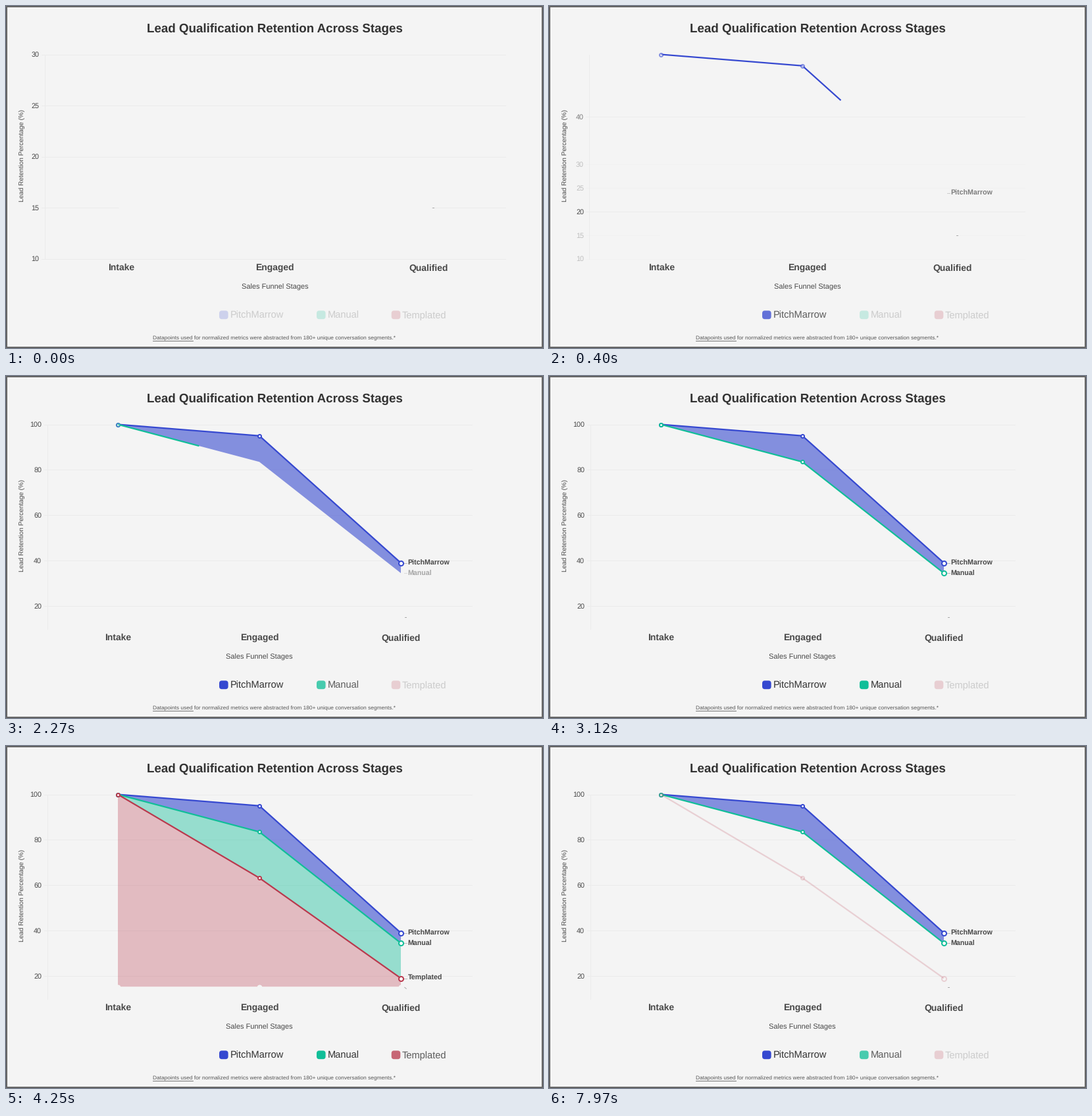
Animation of 816x519 px, one loop 8 s. Source, as a matplotlib script:

```python
import matplotlib.pyplot as plt
import numpy as np
from matplotlib.animation import FuncAnimation
from matplotlib.patches import FancyBboxPatch, Polygon, Rectangle

W, H, STEP, LOOP = 816, 519, 20, 8000
BG, DARK, MID = "#f4f4f4", "#333333", "#484848"
TOP, BOTTOM = 73.5, 383.5
CLIP_MS, FADE_MS = 714, 662

plt.rcParams["font.family"] = "Liberation Sans"
plt.rcParams["text.hinting"] = "none"
fig = plt.figure(figsize=(W / 72, H / 72), dpi=72, facecolor=BG)
ax = fig.add_axes([0, 0, 1, 1])
ax.set_xlim(0, W)
ax.set_ylim(H, 0)
ax.axis("off")


def ease(u):
    u = min(max(u, 0), 1)
    return 4 * u**3 if u < 0.5 else 1 - 4 * (1 - u) ** 3


def lerp(a, b, p):
    return a + (b - a) * p


def label(x, y, s, size, color=MID, weight="normal", ha="center", rot=0):
    """Text whose capitals are centred on the given point."""
    off = 0.36 * size
    x, y = (x + off, y) if rot else (x, y + off)
    return ax.text(x, y, s, size=size, color=color, weight=weight, ha=ha,
                   va="baseline", rotation=rot, rotation_mode="anchor", zorder=9)


def stroke(color, lw, z, **kw):
    return ax.plot([], [], color=color, lw=lw, zorder=z, **kw)[0]


def show(artist, alpha):
    artist.set_alpha(min(max(alpha, 0), 1))
    artist.set_visible(alpha > 0.004)


def scale(v, unit):
    return BOTTOM - (np.asarray(v) - 10) * unit


class Series:
    def __init__(self, name, color, values, fill, start, label_y, z):
        self.start = start
        self.x = np.array([170, 385, 600])
        self.y = scale(values, 310 / 90)
        self.area = Polygon([(0, 0)] * 3, fc=color, alpha=fill, lw=0, zorder=2)
        ax.add_patch(self.area)
        self.line = stroke(color, 2.2, z, solid_capstyle="butt",
                           solid_joinstyle="round")
        self.dots = [stroke(color, 0, z + 0.5, marker="o", ms=d, mfc="white",
                            mew=2) for d in (5, 7)]
        self.tag = label(610.5, label_y, name, 10.6, weight="bold", ha="left")
        self.dash = ax.plot([605, 608.5], [self.y[2]] * 2, color="#bbbbbb",
                            lw=1, zorder=3)[0]

    def trace(self, edge):
        """Visible part of the polyline left of the reveal edge."""
        x = np.append(self.x[self.x < edge], min(edge, 600))
        if edge <= self.x[0]:
            x = x[:0]
        return x, np.interp(x, self.x, self.y)

    def fill(self, x, low, on):
        self.area.set_visible(bool(on) and len(x) > 1)
        if len(x) > 1:
            up = np.interp(x, self.x, self.y)
            down = np.interp(x, self.x, low)
            self.area.set_xy(np.column_stack([np.r_[x, x[::-1]],
                                              np.r_[up, down[::-1]]]))

    def draw(self, t, alpha=1, tagged=True):
        q = ease((t - self.start) / CLIP_MS)
        edge = lerp(59, 710, q)
        x, y = self.trace(edge)
        self.line.set_data(x, y)
        show(self.line, alpha)
        seen = self.x < edge
        for dots, part in zip(self.dots, (slice(0, 2), slice(2, 3))):
            dots.set_data(self.x[part][seen[part]], self.y[part][seen[part]])
            show(dots, alpha * q)
        tag = ease((t - self.start) / FADE_MS) if tagged else 0
        show(self.tag, tag)
        show(self.dash, tag)
        return x


class LegendItem:
    def __init__(self, x, tx, name, color):
        self.box = FancyBboxPatch((x + 4, 466.3), 5.6, 4.9, fc=color, lw=0,
                                  boxstyle="round,pad=4,rounding_size=4")
        ax.add_patch(self.box)
        self.text = label(tx, 468.2, name, 14.6, ha="left")

    def draw(self, state):
        alpha, color = {"off": (0.2, "#cccccc"), "hover": (0.76, "#5c5c5c"),
                        "on": (1, DARK)}[state]
        self.box.set_alpha(alpha)
        self.text.set_color(color)


# Static parts
ax.add_patch(Rectangle((1, 1), W - 2, H - 2, fill=False, ec="#666666", lw=2,
                       zorder=10))
label(408, 33, "Lead Qualification Retention Across Stages", 18.7, DARK, "bold")
label(23.2, 226.5, "Lead Retention Percentage (%)", 10.05, rot=90)
label(223, 503, "Datapoints used for normalized metrics were abstracted from "
      "180+ unique conversation segments.*", 8.4, "#555555", ha="left")
ax.plot([223, 284], [507.5] * 2, color="#555555", lw=0.8)

# Axes
OLD, NEW = {10, 15, 20, 25, 30}, {20, 40, 60, 80, 100}
ticks = {v: (stroke("#ebebeb", 1, 1), label(0, 0, str(v), 10.8, ha="right"))
         for v in sorted(OLD | NEW)}
axis_line = stroke("#ebebeb", 1, 1)
cats = [label(0, 396, s, 13.9, MID, "bold")
        for s in ("Intake", "Engaged", "Qualified")]
axis_name = label(0, 426, "Sales Funnel Stages", 10.95)

# Data
BRAND = "PitchMarrow"
BLUE, GREEN, RED = "#3548d0", "#10be98", "#b9394d"
lead = Series(BRAND, BLUE, [100, 95, 39], 0.59, 30, 283, 4)
manual = Series("Manual", GREEN, [100, 83.5, 34.5], 0.41, 1950, 299, 5)
templ = Series("Templated", RED, [100, 63.2, 19], 0.3, 3530, 351.3, 6)
base = stroke(BG, 2.6, 3, marker="o", ms=8, mew=0)
base_mark = stroke("#a8a8a8", 1, 3)
legend = [LegendItem(324, 341, BRAND, BLUE),
          LegendItem(472, 488.5, "Manual", GREEN),
          LegendItem(585.7, 601.5, "Templated", RED)]


def draw_axes(p):
    left, right = lerp(58.5, 62.5, p), lerp(759, 707.5, p)
    unit = lerp(15.5, 310 / 90, p)
    for v, (line, text) in ticks.items():
        y = float(scale(v, unit))
        a = (1 - p) * (v in OLD) + p * (v in NEW)
        a *= y > TOP - 1.5
        line.set_data([left - 5, right], [y, y])
        text.set_position((left - 8.3, y + 0.36 * 10.8))
        show(line, a)
        show(text, a)
    axis_line.set_data([left, left], [TOP, BOTTOM])
    xs = left + (right - left) * np.array([1, 3, 5]) / 6
    for text, x in zip(cats, xs):
        text.set_x(x)
    axis_name.set_x(xs[1])
    base.set_data(xs, [scale(15, unit)] * 3)
    return xs[2], float(scale(15, unit))


def state(t, *changes):
    return [s for at, s in ((0, "off"),) + changes if t >= at][-1]


def update(i):
    t = i * STEP + STEP / 2
    bx, by = draw_axes(ease((t - 30) / FADE_MS))
    tilt = 2 if 3530 <= t < 7700 else 0
    base_mark.set_data([bx + 5.8, bx + 8.2], [by, by + tilt])

    x = lead.draw(t)
    lead.fill(x, manual.y, t >= 1950)
    x = manual.draw(t)
    manual.fill(lead.x, templ.y, 3530 <= t < 7530)
    fade = 1 - ease((t - 7550) / FADE_MS)
    x = templ.draw(t, fade, t < 7530)
    templ.fill(x, [by] * 3, t < 7530)

    legend[0].draw(state(t, (40, "hover"), (1090, "on")))
    legend[1].draw(state(t, (1950, "hover"), (3120, "on"), (7900, "hover")))
    legend[2].draw(state(t, (3530, "hover"), (7530, "off")))
    return []


anim = FuncAnimation(fig, update, frames=LOOP // STEP, interval=STEP,
                     repeat=True, repeat_delay=0)
plt.show()
```
